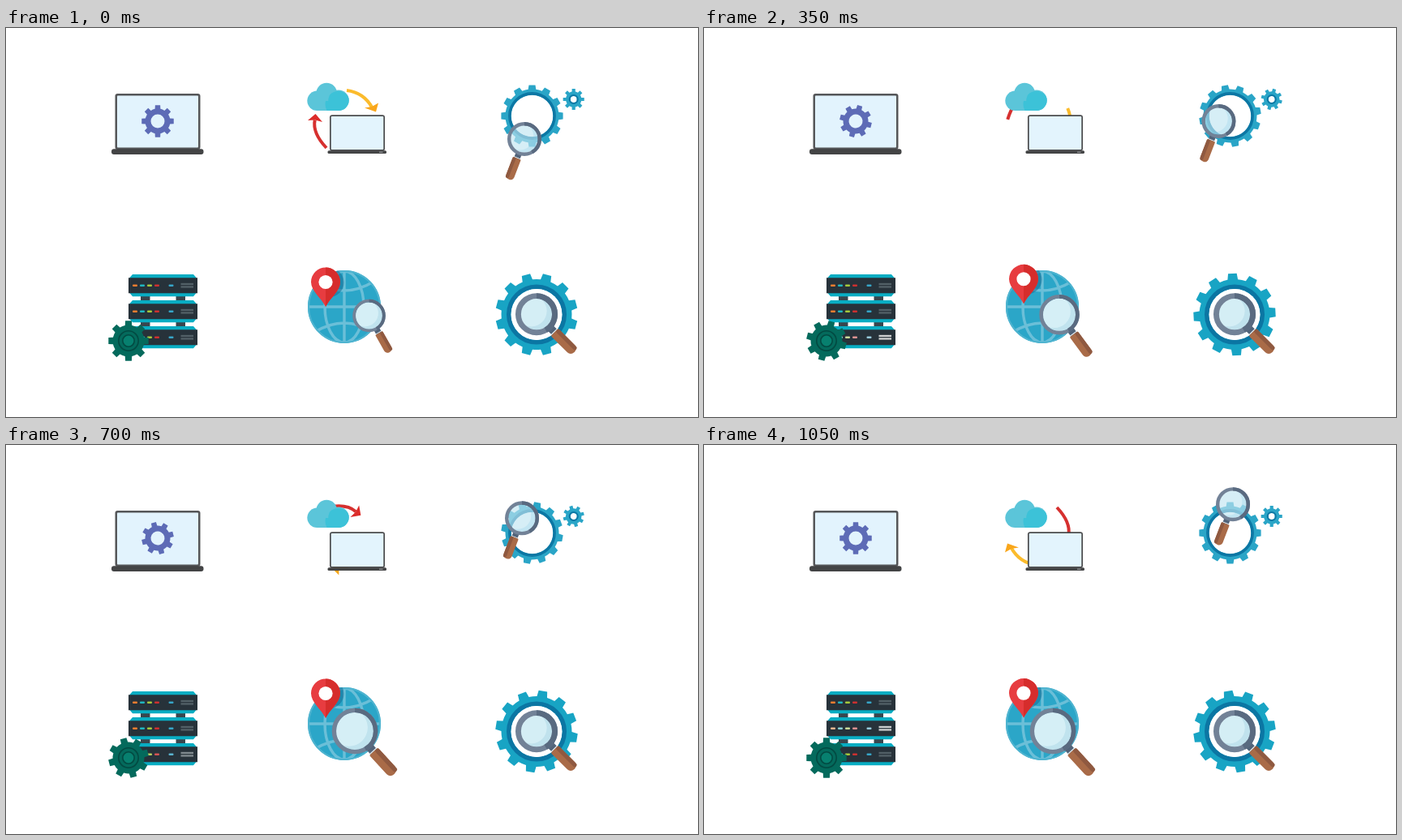
An HTML page with a canvas for the animation above (1120 ms loop, 853 by 480 pixels).

```html
<!DOCTYPE html>
<html lang="en">
<head>
<meta charset="utf-8">
<title>Technology icons</title>
<style>
  html, body { margin: 0; width: 100%; height: 100%; overflow: hidden; background: #fff; }
  canvas { display: block; }
</style>
</head>
<body>
<canvas id="stage" width="853" height="480"></canvas>
<script>
const ctx = document.getElementById('stage').getContext('2d');
const LOOP = 1120, STEP = 70, TAU = Math.PI * 2;
const rad = d => d * Math.PI / 180;

function disc(x, y, r, fill) {
  ctx.fillStyle = fill;
  ctx.beginPath();
  ctx.arc(x, y, r, 0, TAU);
  ctx.fill();
}

function ring(x, y, r, w, color) {
  ctx.strokeStyle = color;
  ctx.lineWidth = w;
  ctx.beginPath();
  ctx.arc(x, y, r, 0, TAU);
  ctx.stroke();
}

function box(x, y, w, h, fill, r = 0) {
  ctx.fillStyle = fill;
  ctx.beginPath();
  ctx.roundRect(x, y, w, h, r);
  ctx.fill();
}

function poly(points, fill) {
  ctx.fillStyle = fill;
  ctx.beginPath();
  points.forEach(p => ctx.lineTo(p[0], p[1]));
  ctx.closePath();
  ctx.fill();
}

function placed(x, y, angle, scale, draw) {
  ctx.save();
  ctx.translate(x, y);
  ctx.rotate(rad(angle));
  ctx.scale(scale, scale);
  draw();
  ctx.restore();
}

// Value of each column at step k, from rows of [step, value, ...]
function track(rows, k) {
  if (k <= rows[0][0]) return rows[0].slice(1);
  for (let i = 1; i < rows.length; i++) {
    const a = rows[i - 1], b = rows[i];
    if (k <= b[0]) {
      const u = (k - a[0]) / (b[0] - a[0]);
      return a.slice(1).map((v, j) => v + (b[j + 1] - v) * u);
    }
  }
  return rows[rows.length - 1].slice(1);
}

function gear(x, y, teeth, outer, body, hole, angle, fill) {
  placed(x, y, angle - 90, 1, () => {
    const pitch = TAU / teeth;
    ctx.beginPath();
    for (let i = 0; i < teeth; i++) {
      const a = i * pitch;
      [[body, -.28], [outer, -.2], [outer, .2], [body, .28]].forEach(([r, d]) =>
        ctx.lineTo(r * Math.cos(a + d * pitch), r * Math.sin(a + d * pitch)));
      ctx.arc(0, 0, body, a + .28 * pitch, a + .72 * pitch);
    }
    ctx.closePath();
    if (hole) {
      ctx.moveTo(hole, 0);
      ctx.arc(0, 0, hole, 0, TAU, true);
    }
    ctx.fillStyle = fill;
    ctx.fill();
  });
}

// Magnifier with outer radius 20 before scaling; the handle points along angle
function magnifier(x, y, angle, scale, rim, glass, shade) {
  placed(x, y, angle, scale, () => {
    box(18, -3.6, 7, 7.2, '#52647a');
    box(23.2, -4.4, 1, 8.8, '#e6edf0');
    box(24.2, -5, 26.6, 10, '#a96b48', [1, 4.5, 4.5, 1]);
    box(24.2, angle > 90 ? 1 : -5, 26, 4, '#8f5940', 2);
  });
  placed(x, y, 0, scale, () => {
    const inner = 20 - rim;
    disc(0, 0, inner + .3, glass);
    ctx.save();
    ctx.beginPath();
    ctx.arc(0, 0, inner, 0, TAU);
    ctx.clip();
    ctx.fillStyle = shade;
    ctx.beginPath();
    ctx.rect(-22, -22, 44, 44);
    ctx.arc(-5, -3, inner, 0, TAU, true);
    ctx.fill();
    ctx.restore();
    ring(0, 0, 20 - rim / 2, rim, '#728297');
    ctx.strokeStyle = '#596a80';
    ctx.beginPath();
    ctx.arc(0, 0, 20 - rim / 2, rad(-90), rad(60));
    ctx.stroke();
  });
}

function laptop(k) {
  box(134.5, 81, 105, 69, '#555658', 3);
  box(137, 83.5, 100, 64, '#e2f3fd', 1);
  box(130, 149.2, 113.5, 6.8, '#434445', 3);
  gear(187, 115, 8, 20, 15.5, 8.5, k * 12, '#5d6bb6');
}

function arrow(k, color, tip, from, bend, to, head) {
  placed(415, 112.5, k * 12, 1, () => {
    ctx.strokeStyle = color;
    ctx.lineWidth = 4;
    ctx.beginPath();
    ctx.moveTo(...from);
    ctx.quadraticCurveTo(...bend, ...to);
    ctx.stroke();
    poly(head, tip);
  });
}

function cloudSync(k) {
  arrow(k, '#fbbb2c', '#f9a61b', [5, -35.5], [26, -33], [36.5, -14],
    [[41, -9], [27, -14], [36, -15.5], [44, -20]]);
  arrow(k, '#d6302f', '#dc2c2a', [-20, 35.5], [-37.5, 17], [-34.3, 1],
    [[-33.5, -6.5], [-43, 1.5], [-34, 1], [-25, 3.5]]);

  const cloud = '#5bc5d9';
  disc(383.5, 89.8, 12.2, cloud);
  disc(395.2, 80.6, 12.8, cloud);
  disc(410, 89.2, 12.7, cloud);
  box(383, 84, 27, 18, cloud);
  ctx.save();
  ctx.beginPath();
  ctx.arc(410, 89.2, 12.7, 0, TAU);
  ctx.rect(392, 90, 18, 12);
  ctx.clip();
  disc(409.5, 94, 16, '#3cc2d8');
  ctx.restore();

  box(399, 107.3, 68, 44.5, '#4a4b4c', 3);
  box(400.7, 109, 64.6, 41, '#e3f4fd', 1);
  box(396.5, 151.2, 72.5, 3.9, '#434445', 1.6);
  box(460, 152.7, 4.5, .9, '#b5b8ba');
}

function gearSearch(k) {
  gear(648.5, 108.5, 12, 38.3, 33, 26, k * 10, '#2aa5c7');
  ring(648.5, 108.5, 27.6, 3.6, '#0c77a4');
  gear(699.7, 88, 8, 13.2, 9.7, 4, k * 12, '#2aa5c7');
  ring(699.7, 88, 5, 2, '#0c77a4');
  const [x, y] = track([[0, 639, 137], [2, 637, 128.3], [4, 635, 120], [7, 633.2, 105],
    [10, 636, 90.3], [13, 644, 78], [15, 652, 73.2]], k);
  magnifier(x, y, 111, 1.05, 4.2, 'rgba(192,229,241,.65)', 'rgba(130,200,225,.25)');
}

function glow(rgb, u) {
  return `rgb(${rgb.map(v => Math.round(v + (235 - v) * u)).join()})`;
}

function serverUnit(y, lit) {
  poly([[156, y], [231, y], [234.5, y + 4], [234.5, y + 23], [231, y + 27.2],
    [156, y + 27.2], [152.5, y + 23], [152.5, y + 4]], '#08adc3');
  box(151, y + 4.2, 85, 19, '#27323a');
  [[156, 238, 125, 48], [165, 32, 182, 192], [174, 165, 200, 60],
   [183, 205, 48, 48], [200.5, 55, 165, 200]].forEach(([x, ...rgb]) =>
    box(x, y + 12.4, 6, 2.5, glow(rgb, lit * .65), 1));
  const bar = glow([82, 96, 103], lit);
  box(215.5, y + 10.8, 15.5, 2.3, bar);
  box(215.5, y + 14.3, 15.5, 2.3, bar);
}

function servers(k) {
  [166, 209.5].forEach(x => box(x, 328, 11.5, 44, '#38464e'));
  const [second] = track([[10, 0], [13, .35], [15, .8]], k);
  const [third] = track([[0, 0], [2, .4], [4, .8], [7, .85], [10, .3], [13, 0]], k);
  [0, second, third].forEach((lit, i) => serverUnit(304 + i * 32, lit));
  gear(151, 386, 8, 25, 19.5, 0, k * 12, '#046a5c');
  ring(151, 386, 12.2, 1.6, '#034a42');
  disc(151, 386, 7.5, '#07806f');
  ring(151, 386, 7.2, 1.6, '#034a42');
}

function globe() {
  const x = 417, y = 344, r = 45;
  disc(x, y, r, '#2ba6c8');
  ctx.save();
  ctx.beginPath();
  ctx.arc(x, y, r, 0, TAU);
  ctx.clip();
  ctx.strokeStyle = '#6bbfd8';
  ctx.lineWidth = 3.4;
  ctx.beginPath();
  ctx.moveTo(x, y - r);
  ctx.lineTo(x, y + r);
  ctx.moveTo(x - r, y);
  ctx.lineTo(x + r, y);
  ctx.moveTo(x + 24, y);
  ctx.ellipse(x, y, 24, 44, 0, 0, TAU);
  [-1, 1].forEach(s => {
    ctx.moveTo(x - 36, y + s * 31);
    ctx.quadraticCurveTo(x, y + s * 9, x + 36, y + s * 31);
  });
  ctx.stroke();
  ctx.restore();
  ring(x, y, r - 1, 2, '#4fb4d0');
}

function pin(x, y) {
  const shape = () => {
    ctx.beginPath();
    ctx.moveTo(x, y + 30.5);
    ctx.bezierCurveTo(x - 5, y + 20, x - 18, y + 11, x - 18, y);
    ctx.arc(x, y, 18, Math.PI, TAU);
    ctx.bezierCurveTo(x + 18, y + 11, x + 5, y + 20, x, y + 30.5);
  };
  ctx.save();
  ctx.beginPath();
  ctx.arc(417, 344, 45, 0, TAU);
  ctx.clip();
  disc(x + 4.5, y + .5, 18, 'rgba(20,110,150,.55)');
  ctx.restore();
  ctx.save();
  shape();
  ctx.clip();
  box(x - 20, y - 20, 40, 52, '#e73c40');
  box(x, y - 20, 20, 52, '#d62d2c');
  ctx.restore();
  disc(x, y, 8.6, '#fff');
}

function mapSearch(k) {
  globe();
  const [lift] = track([[0, 0], [2, 1], [4, 2.8], [7, 5.6], [10, 7], [13, 7.4], [15, 7.4]], k);
  pin(394, 313.5 - lift);
  const [x, y, size, angle] = track([[0, 447.5, 355, 20.3, 60.5], [2, 445.7, 354.6, 21, 59.5],
    [4, 440.5, 354, 23.6, 55.5], [7, 433, 353.2, 27, 50], [10, 430, 353, 28.3, 47.5],
    [13, 429.2, 353, 28.5, 47], [15, 430, 353, 28.3, 47.5]], k);
  magnifier(x, y, angle, size / 20, 3.8, '#d5eff6', '#c0e3ee');
}

function bigGear(k) {
  const x = 654, y = 353.5;
  gear(x, y, 12, 50.8, 43.5, 31.5, 15 + k * 8.4, '#18a4c4');
  ring(x, y, 34.2, 5.6, '#0b76a3');
  disc(x, y, 31.5, '#fff');
  magnifier(x, y - .3, 45, 1.3, 5.3, '#d4eef5', '#c0e2ed');
}

function frame(now) {
  const k = Math.floor((now % LOOP) / STEP);
  ctx.fillStyle = '#fff';
  ctx.fillRect(0, 0, 853, 480);
  [laptop, cloudSync, gearSearch, servers, mapSearch, bigGear].forEach(draw => draw(k));
}

const start = performance.now();
function tick() {
  frame(performance.now() - start);
  requestAnimationFrame(tick);
}
tick();
</script>
</body>
</html>
```
